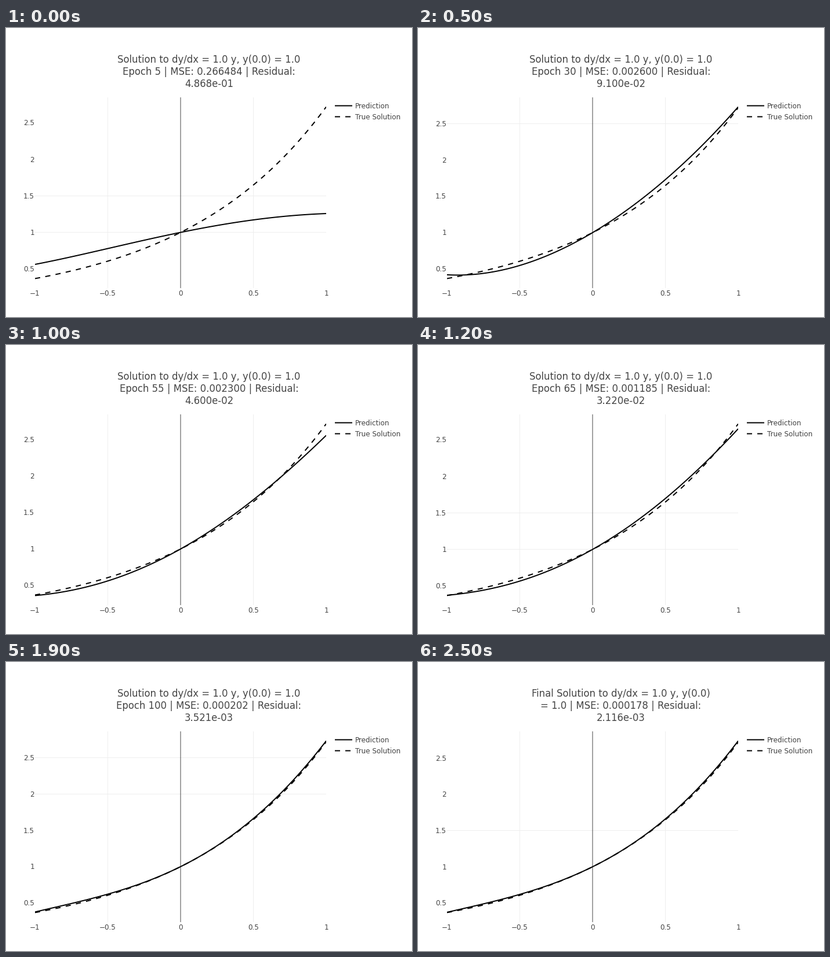
Recreate the animation shown at these times as a matplotlib script. Size 700 px wide and 500 px high, loop 2.6 s.

```python
import numpy as np
import matplotlib.pyplot as plt
from matplotlib.animation import FuncAnimation
from matplotlib.patches import Rectangle

PX = 0.72  # points per pixel at 100 dpi
LEFT, RIGHT, TOP, BOTTOM = 50, 552, 120, 450
FRAMES, INTERVAL = 26, 100
INK = "#444444"
GRID = "#eeeeee"

# epoch, MSE, residual, coefficients of x, x^2, x^3, x^4 in the prediction
KNOTS = np.array([
    (5, 0.266484, 4.868e-1, 0.407, -0.103, -0.059, 0.013),
    (20, 0.004010, 1.257e-1, 1.167, 0.498, -0.173, -0.007),
    (30, 0.002600, 9.100e-2, 1.190, 0.550, -0.035, 0.025),
    (45, 0.004710, 6.562e-2, 1.1025, 0.4305, -0.062, -0.018),
    (55, 0.002300, 4.600e-2, 1.120, 0.480, -0.020, -0.020),
    (65, 0.001185, 3.220e-2, 1.128, 0.531, 0.0115, -0.0195),
    (80, 0.000242, 1.347e-2, 1.050, 0.549, 0.085, -0.028),
    (100, 0.000202, 3.521e-3, 0.995, 0.572, 0.1825, -0.0184),
    (125, 0.000178, 2.116e-3, 0.994, 0.559, 0.1885, -0.0045),
])
LOG_EPOCH = np.log(KNOTS[:, 0])

xs = np.linspace(-1, 1, 201)
true_y = np.exp(xs)
TICKS = (0.5, 1, 1.5, 2, 2.5)

plt.rcParams["font.family"] = "DejaVu Sans"
plt.rcParams["path.simplify"] = False

fig = plt.figure(figsize=(7, 5), dpi=100, facecolor="white")
ax = fig.add_axes([0, 0, 1, 1])
ax.set_xlim(0, 700)
ax.set_ylim(500, 0)
ax.axis("off")
clip = Rectangle((LEFT, TOP), RIGHT - LEFT, BOTTOM - TOP, transform=ax.transData)


def stroke(x, y, color, width, dashed=False, z=2):
    style = (0, (4.5, 4.5)) if dashed else "-"
    line, = ax.plot(x, y, color=color, lw=width * PX, ls=style, zorder=z,
                    solid_capstyle="butt", dash_capstyle="butt", snap=False)
    return line


def label(x, y, text, size=12, align="left"):
    return ax.text(x, y, text, size=size * PX, color=INK, ha=align, va="baseline")


def to_px(x):
    return LEFT + (x + 1) / 2 * (RIGHT - LEFT)


for tick in (-0.5, 0.5):
    stroke([to_px(tick)] * 2, [TOP, BOTTOM], GRID, 1, z=1)
stroke([to_px(0)] * 2, [TOP, BOTTOM], INK, 1, z=1.5)
for tick, text in zip((-1, -0.5, 0, 0.5, 1), ("−1", "−0.5", "0", "0.5", "1")):
    label(to_px(tick), 463, text, align="center")

for y, name, dashed in ((134.5, "Prediction", False), (153.5, "True Solution", True)):
    stroke([567, 597], [y, y], "black", 2, dashed)
    label(602, y + 4.5, name)

grid_lines = [stroke([LEFT, RIGHT], [0, 0], GRID, 1, z=1) for _ in TICKS]
tick_labels = [label(49, 0, f"{t:g}", align="right") for t in TICKS]
title = [label(350, y, "", 16.5, "center") for y in (60, 81, 102)]
pred_line = stroke(to_px(xs), xs, "black", 2)
true_line = stroke(to_px(xs), xs, "black", 2, dashed=True, z=3)
for curve in (pred_line, true_line):
    curve.set_clip_path(clip)


def training_state(epoch):
    """MSE, residual and predicted curve at an epoch."""
    at = np.log(epoch)
    mse, residual = (np.exp(np.interp(at, LOG_EPOCH, np.log(KNOTS[:, k]))) for k in (1, 2))
    coeffs = [np.interp(at, LOG_EPOCH, KNOTS[:, k]) for k in range(3, 7)]
    return mse, residual, 1 + sum(c * xs ** (k + 1) for k, c in enumerate(coeffs))


def update(i):
    final = i == FRAMES - 1
    epoch = min(5 * (i + 1), 125)
    mse, residual, pred = training_state(epoch)

    # autorange with 5% padding at each end
    low = min(true_y.min(), pred.min())
    high = max(true_y.max(), pred.max())
    height = BOTTOM - TOP

    def y_px(y):
        return BOTTOM - height * (0.05 + 0.9 * (y - low) / (high - low))

    pred_line.set_ydata(y_px(pred))
    true_line.set_ydata(y_px(true_y))
    for tick, line, text in zip(TICKS, grid_lines, tick_labels):
        y = y_px(tick)
        row = np.floor(y) + 0.5
        line.set_ydata([row, row])
        line.set_visible(abs(y - row) < 0.19)  # rules between two rows fade out
        text.set_y(y + 4.3)

    scores = f"MSE: {mse:.6f} | Residual:"
    if final:
        lines = ("Final Solution to dy/dx = 1.0 y, y(0.0)", f"= 1.0 | {scores}")
    else:
        lines = ("Solution to dy/dx = 1.0 y, y(0.0) = 1.0", f"Epoch {epoch} | {scores}")
    for text, content in zip(title, (*lines, f"{residual:.3e}")):
        text.set_text(content)
    return [pred_line, true_line, *grid_lines, *tick_labels, *title]


anim = FuncAnimation(fig, update, frames=FRAMES, interval=INTERVAL,
                     repeat=True, repeat_delay=0, blit=False)
plt.show()
```
